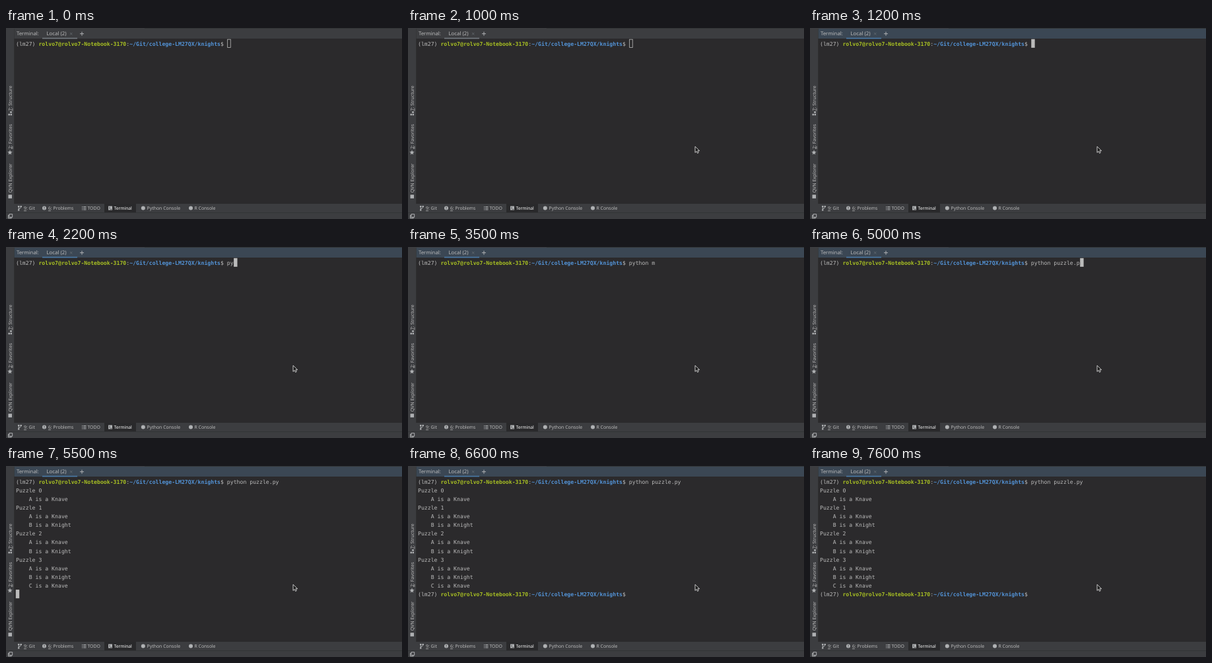
An HTML page for the animation above (8 s loop, 600 px wide and 289 px high).

```html
<!DOCTYPE html>
<html lang="en">
<head>
<meta charset="utf-8">
<title>Terminal session</title>
<style>
  html, body { margin: 0; width: 100%; height: 100%; overflow: hidden; background: #2b2a2c; }
  svg { display: block; width: 600px; height: 289px; }
  text { white-space: pre; text-rendering: geometricPrecision; }
  .ui { font: 6.9px "Noto Sans", sans-serif; fill: #bbbbbb; }
  .head { font-size: 7.8px; }
  .mono { font: 8.19px "DejaVu Sans Mono", monospace; fill: #bbbbbb; }
  .user { font-weight: 700; fill: #a8c023; }
  .path { font-weight: 700; fill: #5394d8; }
  .u { text-decoration: underline; }
  .icon { fill: #afb1b3; }
  .line { fill: none; stroke: #afb1b3; stroke-width: 1; }
</style>
</head>
<body>
<svg viewBox="0 0 600 289" xmlns="http://www.w3.org/2000/svg">
  <rect width="600" height="289" fill="#3c3d40"/>
  <rect x="210" width="390" height="1" fill="#323435"/>
  <rect id="header" x="12" y="1" width="588" height="15"/>
  <rect x="12" y="16" width="588" height="250" fill="#2b2a2c"/>
  <rect x="12" y="1" width="0.6" height="265" fill="#323435"/>
  <rect id="underline" x="55" y="14.8" width="53" height="1.6"/>

  <g class="ui">
    <text class="head" x="15.9" y="11.4">Terminal:</text>
    <text class="head" x="61.5" y="11.4">Local (2)</text>
    <path d="M97 7l3.4 3.4M100.4 7l-3.4 3.4" stroke="#6e7377" stroke-width=".7"/>
    <path class="line" d="M112 8.7h6M115 5.7v6" stroke-width="1.1"/>

    <text transform="translate(8.6 125.5) rotate(-90)" font-size="7"><tspan class="u">7</tspan>: Structure</text>
    <text transform="translate(8.6 183) rotate(-90)" font-size="7"><tspan class="u">2</tspan>: Favorites</text>
    <text transform="translate(8.6 249.3) rotate(-90)" font-size="7">QVN Explorer</text>
    <path class="icon" d="M6 126.2h3v2.4h-3zM3.5 129.8h2.4v2.4h-2.4zM6.6 129.8h2.4v2.4h-2.4z"/>
    <path class="icon" d="M6 184.6l1 2.5 2.7.2-2.1 1.7.7 2.6-2.3-1.4-2.3 1.4.7-2.6-2.1-1.7 2.7-.2z"/>
    <rect class="icon" x="3.5" y="252.3" width="5.5" height="5.5"/>
    <rect y="279" width="600" height="0.8" fill="#303234"/>
    <rect x="149" y="266" width="48" height="13" fill="#29292b"/>

    <path class="line" d="M19.2 270v6M22.7 270v1.2q0 1.8-3.5 2.2" stroke-width=".9"/>
    <path class="icon" d="M18 269h2.4v2h-2.4zM21.5 269h2.4v2h-2.4zM18 274.5h2.4v2h-2.4z"/>
    <text x="27" y="275.4"><tspan class="u">9</tspan>: Git</text>

    <circle class="icon" cx="58" cy="272.6" r="3"/>
    <path d="M58 270.7v2.3M58 273.8v.9" stroke="#3c3d40" stroke-width=".9"/>
    <text x="64" y="275.4"><tspan class="u">6</tspan>: Problems</text>

    <path class="line" d="M115 270.5h1.2M117.2 270.5h4.3M115 272.7h1.2M117.2 272.7h4.3M115 274.9h1.2M117.2 274.9h4.3"/>
    <text x="123.4" y="275.4">TODO</text>

    <rect class="icon" x="155" y="269.5" width="6" height="6"/>
    <path d="M156.2 271l1.4 1.3-1.4 1.3M158.3 274.3h1.8" fill="none" stroke="#29292b" stroke-width=".8"/>
    <text x="163.4" y="275.4" font-size="6.7" style="fill:#fff">Terminal</text>

    <circle class="icon" cx="207.8" cy="272.6" r="3"/>
    <text x="213.5" y="275.4">Python Console</text>
    <circle class="icon" cx="280" cy="272.6" r="3"/>
    <text x="285.5" y="275.4">R Console</text>

    <path class="line" d="M5 281.7h4.7v4.6h-4.7zM5 283.2h-1.5v4.6h4.7v-1.5" stroke-width=".8"/>
  </g>

  <g id="screen" class="mono"></g>
  <rect id="caret"/>
  <path id="pointer" d="M0 0v9.2l2.1-2 1.5 3 1.6-.8-1.4-2.9h2.9z" fill="#1c1c1c" stroke="#f2f2f2" stroke-width=".8"/>
</svg>
<script>
  const LOOP = 8000, LEFT = 15, CHAR = 4.93, ROW = 13.1;
  const ENTER = 5500, PROMPT_BACK = 5600, FOCUS = 1200;
  const $ = id => document.getElementById(id);

  const user = 'rolvo7@rolvo7-Notebook-3170', path = '~/Git/college-LM27QX/knights';
  const promptLength = `(lm27) ${user}:${path}$ `.length;
  const prompt = `(lm27) <tspan class="user">${user}</tspan>:<tspan class="path">${path}</tspan>$ `;

  const puzzles = ['A', 'AB', 'AB', 'ABC'];
  const output = puzzles.flatMap((names, i) => [
    `Puzzle ${i}`,
    ...[...names].map(n => `    ${n} is a ${n === 'B' ? 'Knight' : 'Knave'}`)
  ]);

  // [time, typed text]
  const typing = [
    [0, ''], [1900, 'p'], [2200, 'py'], [2300, 'pyt'], [2400, 'pyth'], [2500, 'pytho'],
    [2700, 'python'], [2900, 'python '], [3000, 'python m'], [3700, 'python '],
    [3800, 'python p'], [4100, 'python pu'], [4200, 'python puz'], [4500, 'python puzz'],
    [4600, 'python puzzl'], [4700, 'python puzzle'], [4800, 'python puzzle.'],
    [5000, 'python puzzle.p'], [5300, 'python puzzle.py']
  ];
  const caretOff = [[1600, 1900], [3500, 3700], [6600, 7200], [7600, LOOP]];
  // [time, x, y]
  const pointerStops = [[800, 300, 184], [900, 399, 182], [1000, 435, 179.3]];

  const latest = (steps, t) => steps.filter(s => s[0] <= t).pop();
  const set = (el, attrs) => {
    for (const name in attrs) el.setAttribute(name, attrs[name]);
  };

  let shown = '';
  function drawLines(lines) {
    const html = lines.map((line, i) =>
      `<text xml:space="preserve" x="${LEFT}" y="${26.7 + i * ROW}">${line}</text>`).join('');
    if (html !== shown) $('screen').innerHTML = shown = html;
  }

  function drawCaret(t, row, column) {
    const focused = t >= FOCUS, inset = focused ? 0 : 0.4;
    set($('caret'), {
      x: LEFT + column * CHAR + inset - 0.2,
      y: 16.8 + row * ROW + inset,
      width: 5.4 - 2 * inset,
      height: ROW - 2 * inset,
      fill: focused ? '#bbbbbb' : 'none',
      stroke: focused ? 'none' : '#bbbbbb',
      'stroke-width': 0.8,
      visibility: caretOff.some(([from, to]) => t >= from && t < to) ? 'hidden' : 'visible'
    });
  }

  function render(t) {
    const focused = t >= FOCUS;
    set($('header'), { fill: focused ? '#3b4754' : '#3c3d40' });
    set($('underline'), { fill: focused ? '#4a7ba8' : '#747a80' });

    const typed = latest(typing, t)[1];
    const lines = [prompt + typed];
    if (t >= ENTER) lines.push(...output);
    if (t >= PROMPT_BACK) lines.push(prompt);
    drawLines(lines);

    if (t < ENTER) drawCaret(t, 0, promptLength + typed.length);
    else drawCaret(t, output.length + 1, t < PROMPT_BACK ? 0 : promptLength);

    const stop = latest(pointerStops, t);
    set($('pointer'), {
      visibility: stop ? 'visible' : 'hidden',
      transform: stop ? `translate(${stop[1]} ${stop[2]})` : ''
    });
  }

  const start = performance.now();
  function tick() {
    render((performance.now() - start) % LOOP);
    requestAnimationFrame(tick);
  }
  tick();
</script>
</body>
</html>
```
